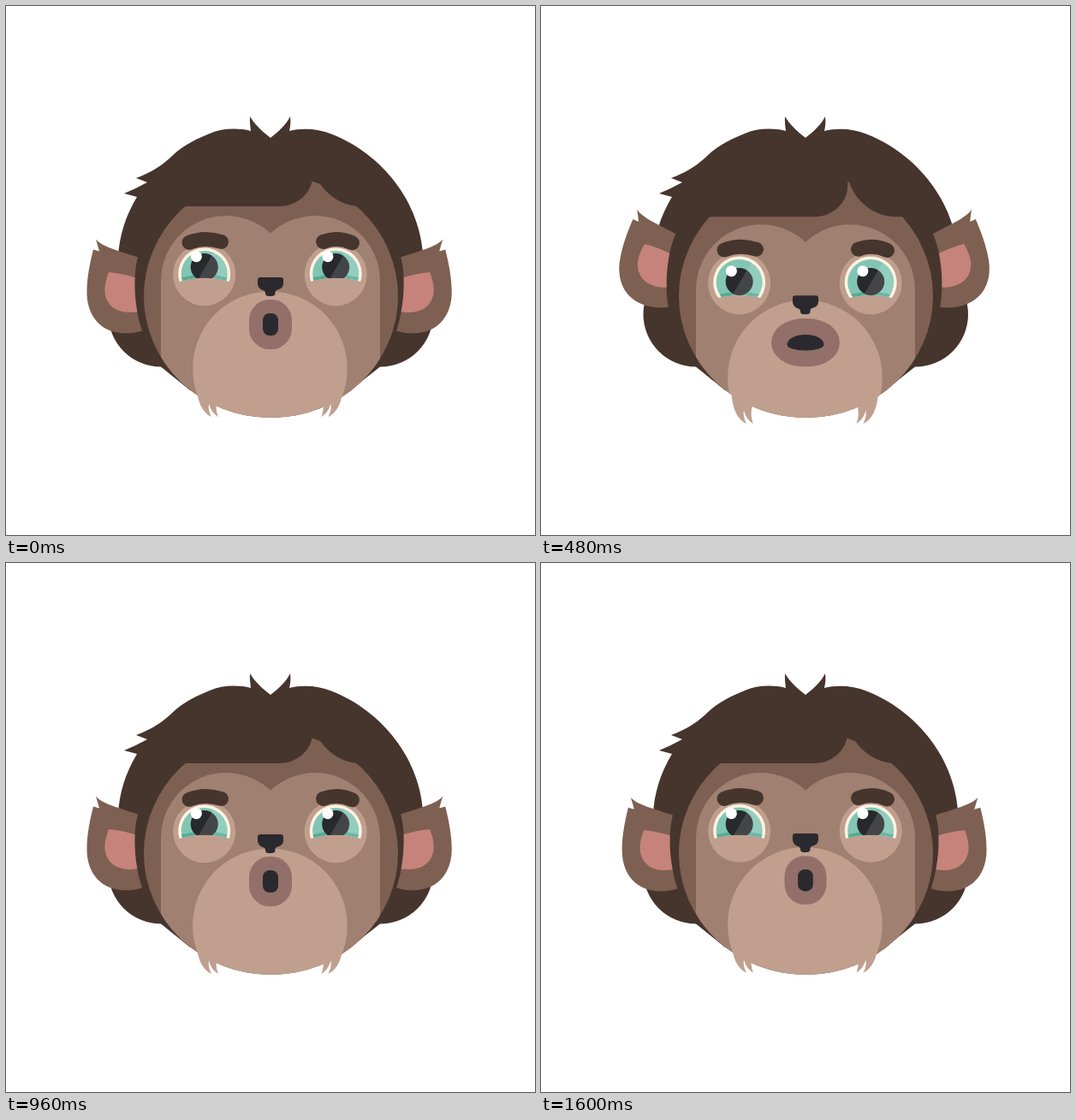
These frames come from a looping animation (618 by 618 pixels, 1680 ms). An HTML page with a canvas:

```html
<!DOCTYPE html>
<html lang="en">
<head>
<meta charset="utf-8">
<title>Monkey face</title>
<style>
html, body { margin: 0; width: 100%; height: 100%; overflow: hidden; background: #fff; }
canvas { display: block; width: 618px; height: 618px; }
</style>
</head>
<body>
<canvas id="stage" width="618" height="618"></canvas>
<script>
const ctx = document.getElementById('stage').getContext('2d');
const LOOP = 1680, STEP = 80;
const C = {
  hair: '#46352d', skin: '#7e6052', light: '#a08070', muzzle: '#c09f8e',
  lip: '#926f69', black: '#2a292d', pink: '#c6837b', line: '#ac8473',
  cream: '#fcf3e2', teal: '#82c5b4', shade: '#58aa95'
};

const raised = { hair: 234, heart: 321, socket: 313.7, brow: 0, nose: 317, muzzle: 423.7,
  tuft: 0, ear: 0, lipW: 50, lipH: 58, gapW: 18, gapH: 26, look: 305, lid: 317.5, wide: 0 };
const lowered = { hair: 248.5, heart: 333, socket: 325.5, brow: 10.3, nose: 342, muzzle: 435.7,
  tuft: 9.5, ear: 10.7, lipW: 85, lipH: 56, gapW: 47, gapH: 17, look: 325, lid: 341.5, wide: 1 };
const shut = { ...raised, hair: 233, socket: 311, brow: -6, nose: 313, muzzle: 418.2,
  tuft: -5, ear: -2.3, lipW: 43, lipH: 50, gapW: 16, gapH: 22 };
const shutLate = { ...shut, hair: 234, nose: 310, muzzle: 415, tuft: -8 };

const lerp = (a, b, k) => a + (b - a) * k;
const clamp = x => Math.min(1, Math.max(0, x));
const ease = x => (x + x * x * (3 - 2 * x)) / 2;

function mix(a, b, k) {
  const out = {};
  for (const key in a) out[key] = lerp(a[key], b[key], k);
  return out;
}

function poseAt(t) {
  if (t < 400) return { ...mix(raised, lowered, ease(clamp(t / 240))), open: 1 };
  if (t < 1040) {
    const p = mix(lowered, raised, ease(clamp((t - 400) / 400)));
    // the gaze settles a little after the head
    p.look += 2 * clamp((t - 480) / 160) * clamp((960 - t) / 160);
    return { ...p, open: 1 };
  }
  if (t < 1120) {
    const k = (t - 960) / 160;
    return { ...mix(raised, shut, k), open: 1 - k };
  }
  if (t <= 1440) return { ...mix(shut, shutLate, (t - 1120) / 320), open: 0 };
  if (t < 1600) {
    const k = (t - 1440) / 160;
    return { ...mix(shutLate, raised, k * 0.85), open: k };
  }
  return { ...mix(shutLate, raised, lerp(0.85, 1, (t - 1600) / 80)), open: 1 };
}

function shape(d, color) {
  ctx.fillStyle = color;
  ctx.fill(new Path2D(d));
}

function disc(x, y, r, color) {
  ctx.fillStyle = color;
  ctx.beginPath();
  ctx.arc(x, y, r, 0, 7);
  ctx.fill();
}

function group(draw) {
  ctx.save();
  draw();
  ctx.restore();
}

// draws once as is, once mirrored about x = axis
function both(axis, draw) {
  group(draw);
  group(() => {
    ctx.translate(axis * 2, 0);
    ctx.scale(-1, 1);
    draw();
  });
}

function faceOval() {
  ctx.beginPath();
  ctx.ellipse(309.5, 339, 148.5, 142, 0, 0, 7);
}

function backHair() {
  disc(181, 360, 61.5, C.hair);
  disc(437.5, 360, 61.5, C.hair);
  shape(`M286 146C285.5 141 284.5 136 285 129C290 138 300 147 309 154
    C318 147 328 138 332 129C333 136 332 141 331 146
    C345 142 365 143 380 149.5C440 173 485 230 487.5 295
    L490 345 437 421.5 402 449 215 449 181 421.5 128 345 131 295
    C132 268 140 245 153 223L138 219C147 215 156 211 165 206L152 201
    C168 195 180 188 191 178C202 167 215 158 238 149C252 143 270 142 286 146Z`, C.hair);
}

function ear(angle) {
  ctx.translate(329, 301);
  ctx.rotate(angle * Math.PI / 180);
  ctx.translate(-329, -301);
  const outer = `M105 272.5C111 281 135 287 154 293.5C149 312 148 345 159 379.5
    C148 383 136 383 128 381C105 376 94 356 94.5 333
    C94.5 318 98 300 102 284.5L109 286.5Z`;
  shape(outer, C.skin);
  ctx.clip(new Path2D(outer));
  shape('M120 311Q136 312 156 319L158 356C140 361 118 357 115.5 334C115 325 118 317 120 311Z', C.pink);
}

function face(p) {
  const y = p.hair;
  group(() => {
    ctx.clip(new Path2D(`M100 ${y}H320C340 ${y} 357 ${y - 16} 358 ${y - 33}L358.7 ${y - 45}
      C364 ${y - 23} 385 ${y} 415 ${y}H520V500H100Z`));
    faceOval();
    ctx.fillStyle = C.skin;
    ctx.fill();
    ctx.clip();
    const h = p.heart;
    shape(`M181 ${h}A76 76 0 0 1 309 ${h - 55.4}A76 76 0 0 1 437 ${h}V490H181Z`, C.light);
  });
}

function eye(x, p) {
  disc(x, p.socket, 36.5, C.muzzle);
  if (p.open <= 0) {
    ctx.strokeStyle = C.line;
    ctx.lineWidth = 3;
    ctx.lineCap = 'round';
    ctx.beginPath();
    ctx.moveTo(x - 29, 308.5);
    ctx.lineTo(x + 29.5, 308.5);
    ctx.stroke();
    return;
  }
  const cy = p.socket - 0.8;
  const top = lerp(308, cy - 33, p.open);
  const lid = lerp(309, p.lid, p.open);
  const arc = `${x - 33} ${lid + 5.5}Q${x} ${lid - 5} ${x + 33} ${lid + 5.5}`;
  group(() => {
    ctx.clip(new Path2D(`M${arc}V${top}H${x - 33}Z`));
    disc(x, cy, 30.5, C.cream);
    disc(x, cy, 27, C.teal);
    group(() => {
      ctx.beginPath();
      ctx.arc(x, cy, 27, 0, 7);
      ctx.clip();
      ctx.strokeStyle = C.shade;
      ctx.lineWidth = 8;
      ctx.stroke(new Path2D('M' + arc));
      disc(x, p.look, 16, '#28292c');
      const a = p.look;
      shape(`M${x + 15} ${a - 24}L${x - 13} ${a + 24}H${x + 40}V${a - 24}Z`, 'rgba(255,255,255,.13)');
    });
    disc(x - 9.3, p.look - 12.3, 6.5, '#fff');
  });
}

function brows(dy) {
  ctx.strokeStyle = C.hair;
  ctx.lineWidth = 17;
  ctx.lineCap = 'round';
  group(() => {
    ctx.translate(0, dy);
    ctx.stroke(new Path2D('M214 276.3Q232 269 251.5 275.5M370.5 275.5Q387 269 404.5 276.8'));
  });
}

function muzzle(p) {
  group(() => {
    faceOval();
    ctx.clip();
    disc(308.4, p.muzzle, 90.3, C.muzzle);
  });
  both(308.2, () => {
    ctx.translate(0, p.tuft);
    shape(`M222.5 446C224 462 229 475 240 480C237 474 236 469 237 464.5
      C239 472 243 477 248 480C245 473 245 465 247.5 456.5Q235 453.5 222.5 446Z`, C.muzzle);
  });
}

function nose(y) {
  group(() => {
    ctx.translate(309, y);
    shape(`M-12 0H12Q15 0 15 3V7C15 12 11 14 8 14.5Q5 15.5 5.5 19Q5.5 22 0 22
      Q-6 22.5 -6 18.5Q-6 15.5 -9 15C-12 14 -15 11 -15 7V3Q-15 0 -12 0Z`, C.black);
  });
}

function pill(cy, w, h, rx, top, bottom, color) {
  const a = { x: w * rx, y: h * top }, b = { x: w * rx, y: h * bottom };
  ctx.fillStyle = color;
  ctx.beginPath();
  ctx.roundRect(309 - w / 2, cy - h / 2, w, h, [a, a, b, b]);
  ctx.fill();
}

function mouth(p) {
  const cy = p.nose + 55 - clamp((317 - p.nose) / 4);
  const r = lerp(0.42, 0.5, p.wide);
  pill(cy, p.lipW, p.lipH, 0.47, r, r, C.lip);
  pill(cy, p.gapW, p.gapH, lerp(0.44, 0.5, p.wide),
    lerp(0.31, 0.64, p.wide), lerp(0.31, 0.36, p.wide), C.black);
}

function draw(p) {
  ctx.fillStyle = '#fff';
  ctx.fillRect(0, 0, 618, 618);
  backHair();
  both(307.6, () => ear(p.ear));
  face(p);
  eye(231.7, p);
  eye(385.2, p);
  brows(p.brow);
  muzzle(p);
  nose(p.nose);
  mouth(p);
}

const start = performance.now();
function tick() {
  const t = (performance.now() - start) % LOOP;
  draw(poseAt(Math.floor(t / STEP) * STEP));
  requestAnimationFrame(tick);
}
tick();
</script>
</body>
</html>
```
